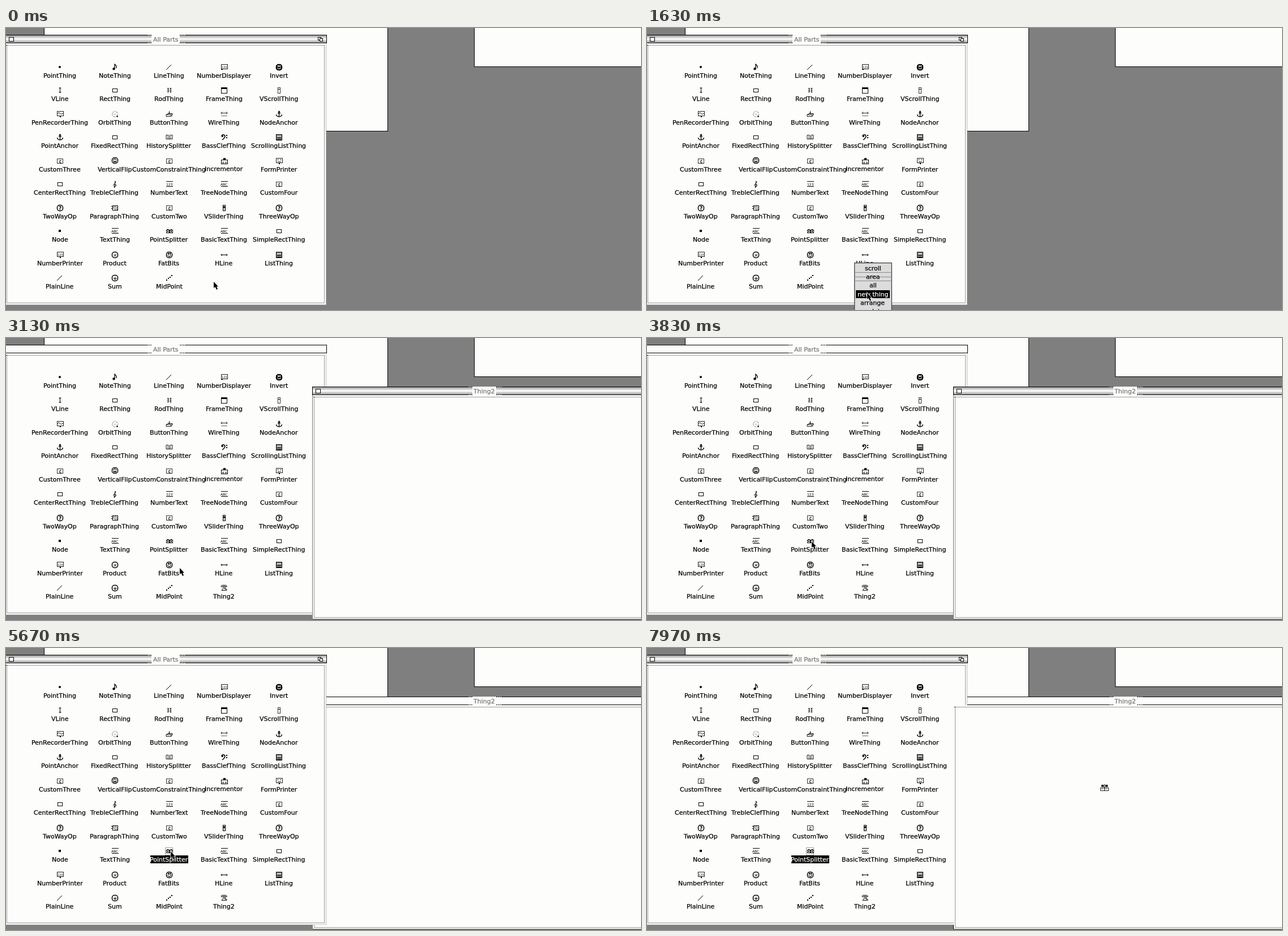
Write an HTML page with a canvas that moves like this. It is 1122 by 499 pixels and loops after 8 s.

```html
<!DOCTYPE html>
<html lang="en">
<head>
<meta charset="utf-8">
<title>All Parts</title>
<style>
html, body { margin: 0; width: 100%; height: 100%; overflow: hidden; background: #7f7f7f; }
canvas { display: block; }
</style>
</head>
<body>
<canvas id="stage" width="1122" height="499"></canvas>
<script>
const c = document.getElementById('stage').getContext('2d', { alpha: false });
const WHITE = '#fdfdfb', GRAY = '#7f7f7f', INK = '#000';
const LOOP = 8000;
const MENU_OPEN = 600, CREATED = 1670, THING_OFF = 4140, PARTS_ON = 4210;
const SELECTED = 5400, PICKED = 6130, PANE_RAISED = 6720;

// Drawing helpers
function bar(x, y, w, h, color = INK) { c.fillStyle = color; c.fillRect(x, y, w, h); }
function box(x, y, w, h, color = INK, fill) {
  if (fill) bar(x, y, w, h, fill);
  c.strokeStyle = color;
  c.lineWidth = 1;
  c.strokeRect(x + .5, y + .5, w - 1, h - 1);
}
function path(d, width = 1) {
  c.strokeStyle = INK;
  c.lineWidth = width;
  c.stroke(new Path2D(d));
}
function disc(x, y, r, color = INK) {
  c.fillStyle = color;
  c.beginPath();
  c.arc(x, y, r, 0, 7);
  c.fill();
}
function text(s, x, baseline, color = INK, size = 11, weight = '') {
  c.font = `${weight} ${size}px "DejaVu Sans", sans-serif`;
  c.fillStyle = c.strokeStyle = color;
  c.lineWidth = .25;
  const left = Math.round(x - c.measureText(s).width / 2);
  c.fillText(s, left, baseline);
  if (size === 11) c.strokeText(s, left, baseline);
}

// Icons, drawn around their own centre
function badge(fill) {
  c.beginPath();
  c.roundRect(-4.5, -4.5, 10, 10, 4);
  c.lineWidth = 1.5;
  c.strokeStyle = c.fillStyle = INK;
  c.stroke();
  if (fill) c.fill();
}
function face(inverse) {
  badge(inverse);
  const color = inverse ? WHITE : INK;
  bar(-2, -3, 2, 3, color);
  bar(1, -3, 2, 3, color);
  c.strokeStyle = color;
  c.lineWidth = 1.2;
  c.beginPath();
  c.arc(.5, .5, 2.8, .2, 2.95);
  c.stroke();
}
function lettered(s) {
  bar(-5, -5, 12, 1);
  bar(-5, 4, 12, 1);
  text(s, .5, 3, INK, 6);
}
function screen(draw) {
  box(-5, -5, 12, 9, '#222');
  draw();
}
function op(sign, weight) {
  badge();
  text(sign, .5, 4, INK, 9, weight);
}
function splitter() {
  for (const x of [-5, 1]) {
    box(x, -2, 6, 6);
    bar(x + 2, -3, 2, 1);
    bar(x + 2, 0, 2, 2);
  }
  bar(0, 1, 2, 1);
}
const number = () => screen(() => text('123', 1, 2, INK, 5));
const foot = () => path('M1 4V6', 2);
const icons = {
  dot() { disc(0, 0, 2); },
  note() { path('M0 3V-5Q4 -2 3 2', 1.3); disc(-1.5, 3.3, 2.2); },
  line() { path('M-5 5L4 -4'); },
  display() { number(); bar(-5, 4, 3, 1); },
  invert() { face(true); },
  fatBits() { face(); },
  flip() { c.rotate(Math.PI); c.translate(-1, 0); face(); },
  vline() { path('M.5 -4V5M-1.5 -3L.5 -5L2.5 -3M-1.5 3L.5 5L2.5 3'); },
  hline() { path('M-5 .5H6M-3 -1.5L-5 .5L-3 2.5M4 -1.5L6 .5L4 2.5'); },
  wire() { path('M-5 -1.5H6M-3 -4L-5 -1.5L-3 .5M4 -4L6 -1.5L4 .5', .8); path('M-5 3.5H6', .6); },
  rect() { box(-4, -3, 9, 7); },
  rod() { for (let y = -4; y < 5; y += 3) { bar(-3, y, 1, 2); bar(2, y, 2, 2); } bar(-1, -4, 1, 8); },
  frame() { box(-5, -5, 11, 11); bar(-5, -5, 11, 3); },
  vscroll() { box(-2, -5, 5, 11, '#333'); bar(-1, -2, 3, 1); },
  vslider() { box(-2, -5, 5, 11); bar(-1, -3, 3, 4, '#333'); bar(-1, 3, 3, 1, '#777'); },
  pen() { screen(() => path('M-4 0Q-2 -4 0 -1T6 -1', .9)); foot(); },
  orbit() {
    for (let i = 0; i < 12; i++) {
      const a = i * Math.PI / 6;
      bar(Math.round(5 * Math.cos(a)), Math.round(5 * Math.sin(a)), 1, 1, '#444');
    }
    bar(0, 0, 1, 1);
    disc(4.5, 4.5, 1.3);
  },
  button() { path('M-5 1.5H3.5V4.5H-5ZL-2 -.5H6L3.5 1.5M6 -.5V2L3.5 4.5M.5 -5V0M-1 -2L.5 0L2 -2', .9); },
  anchor() { path('M.5 -3V5M-2 -1.5H3M-4.5 1Q-4 5 .5 5Q5 5 5.5 1', 1.4); disc(.5, -4, 1.5); },
  history() { path('M-5 -3.5H-1L.5 -2L2 -3.5H6V3.5H-5ZM.5 -2V3.5M-3 -1H-1M-3 1.5H-1M2 -1H4M2 1.5H4', .9); },
  bass() { path('M-4 -1Q-4 -5 0 -4Q5 -1 -3 5', 1.5); disc(-2.5, -1.5, 1.6); bar(4, -4, 2, 2); bar(4, 0, 2, 2); },
  treble() { path('M.5 6V-5Q4 -4 -1 0Q-4 3 0 4Q4 4 2 1Q0 0 -1 2', .9); disc(-.5, 5.5, 1); },
  list() { box(-5, -5, 11, 11, INK, '#888'); for (let y = -2; y < 5; y += 3) bar(-3, y, 7, 1, y < 0 ? WHITE : INK); },
  custom() { box(-5, -4, 11, 9, '#333'); text('¢', .5, 4, INK, 9); },
  increment() { box(-5, -2, 12, 8); bar(-1, -5, 4, 3); text('++', 1, 5, INK, 6, 'bold'); },
  form() { screen(() => { bar(-2, -3, 1, 2); bar(3, -3, 1, 2); path('M-2 1.5H4', .8); }); foot(); },
  printer() { number(); foot(); },
  digits() { lettered('123'); },
  letters() { lettered('ABC'); },
  ask() { op('?', 'bold'); },
  times() { op('×', ''); },
  plus() { op('+', 'bold'); },
  hatch() { box(-4, -4, 10, 9); path('M-3 -1L2 4M-3 -4L5 4M0 -4L5 1', .8); bar(-6, -3, 2, 1); bar(-6, 1, 2, 1); },
  node() { bar(-2, -2, 4, 4); },
  splitter,
  mid() { for (let i = 0; i < 4; i++) bar(-5 + 3 * i, 3 - 3 * i + (i > 1), 2, 2); },
  thing() { path('M-4.5 -1.5Q-6 -4.5 -2 -4.5H2Q6 -4.5 5 -1.5L3 -2.5H-2ZM-1 -2V1L-4 4.5H5V2.5H2V-2M0 .5H3'); }
};

const parts = `PointThing dot,NoteThing note,LineThing line,NumberDisplayer display,Invert invert,
VLine vline,RectThing rect,RodThing rod,FrameThing frame,VScrollThing vscroll,
PenRecorderThing pen,OrbitThing orbit,ButtonThing button,WireThing wire,NodeAnchor anchor,
PointAnchor anchor,FixedRectThing rect,HistorySplitter history,BassClefThing bass,ScrollingListThing list,
CustomThree custom,VerticalFlip flip,CustomConstraintThing custom,Incrementor increment,FormPrinter form,
CenterRectThing rect,TrebleClefThing treble,NumberText digits,TreeNodeThing letters,CustomFour custom,
TwoWayOp ask,ParagraphThing hatch,CustomTwo custom,VSliderThing vslider,ThreeWayOp ask,
Node node,TextThing letters,PointSplitter splitter,BasicTextThing letters,SimpleRectThing rect,
NumberPrinter printer,Product times,FatBits fatBits,HLine hline,ListThing list,
PlainLine line,Sum plus,MidPoint mid,Thing2 thing`.split(',').map(s => s.trim().split(' '));

function drawIcon(draw, x, y) {
  c.save();
  c.translate(x, y);
  draw();
  c.restore();
}

function drawParts(t) {
  parts.forEach(([name, icon], i) => {
    if (name === 'Thing2' && t < CREATED) return;
    const x = Math.round(95 + 96.7 * (i % 5));
    const y = Math.round(84 + 41.45 * Math.floor(i / 5));
    const chosen = name === 'PointSplitter' && t >= SELECTED;
    if (chosen) {
      bar(255, y - 7, 67, 14);
      box(x - 7, y - 21, 14, 14, '#999');
    }
    drawIcon(icons[icon], x, y - 15);
    text(name, x, y + (name === 'Incrementor' ? 3 : 4), chosen ? WHITE : INK);
  });
}

function titleBar(x, y, w, title, center, active) {
  box(x, y, w, 15, INK, WHITE);
  if (active) {
    const shade = c.createLinearGradient(0, y + 1, 0, y + 14);
    [[0, '#999'], [.5, '#fff'], [1, '#999']].forEach(s => shade.addColorStop(...s));
    bar(x + 1, y + 1, w - 2, 13, shade);
    box(x + 6, y + 4, 9, 8, INK, WHITE);
    box(x + w - 16, y + 4, 6, 6, INK, WHITE);
    box(x + w - 13, y + 6, 6, 6, INK, WHITE);
  }
  const half = center < 300 ? 25 : 21;
  bar(center - half, y, 2 * half, 17, WHITE);
  for (const side of [-half - 8, half])
    for (let i = 0; i < 8; i += 3)
      for (const edge of [0, 14]) bar(center + side + i + 2, y + edge, 1, 1, WHITE);
  text(title, center, y + 12, '#777');
}

function pane(x, y, w, h) {
  bar(x, y, w, h, WHITE);
  box(x + 2, y + 3, w - 5, h - 6, '#999');
  bar(x + 1, y + 3, 2, 1);
}

function partsWindow(t, active) {
  pane(-1, 27, 567, 463);
  bar(565, 28, 1, 462, '#bbb');
  bar(0, 489, 566, 1, '#ccc');
  titleBar(-1, 12, 568, 'All Parts', 282, active);
  drawParts(t);
}

function thingPane() {
  pane(542, 101, 620, 397);
  bar(541, 490, 1, 8);
  bar(541, 497, 581, 1, '#555');
}
function thingWindow(active) {
  thingPane();
  bar(541, 101, 1, 397, '#777');
  titleBar(541, 86, 607, 'Thing2', 845, active);
}

function backdrop() {
  bar(0, 0, 1122, 499, GRAY);
  box(67, -2, 608, 185, INK, WHITE);
  box(827, -2, 300, 71, INK, WHITE);
}

function menu() {
  box(366, 415, 67, 100, '#444', '#dcdcdc');
  box(367, 416, 65, 100, '#aaa');
  for (const y of [432, 440, 447]) bar(368, y, 63, 1, '#888');
  ['scroll', 'area', 'all', 'new thing', 'arrange', 'update'].forEach((item, i) => {
    const y = Math.round(425 + 15.2 * i), chosen = i === 3;
    if (chosen) bar(369, y - 7, 60, 14);
    text(item, 399, y + 4, chosen ? WHITE : INK);
  });
}

// Positions are [time, x, y], eased from stop to stop
const pointerStops = [[150, 367, 449], [600, 389, 462], [1000, 389, 469], [2250, 389, 469],
  [3130, 307, 407], [3750, 291, 360], [LOOP, 291, 360]];
const carryStops = [[PICKED, 289, 360], [6770, 654, 190], [7650, 808, 247], [LOOP, 808, 247]];

function along(stops, t) {
  const i = stops.findIndex(s => s[0] > t);
  if (i < 1) return stops[0].slice(1);
  const [t0, x0, y0] = stops[i - 1], [t1, x1, y1] = stops[i];
  const u = (t - t0) / (t1 - t0), k = u * u * (3 - 2 * u);
  return [Math.round(x0 + (x1 - x0) * k), Math.round(y0 + (y1 - y0) * k)];
}

function pointer() {
  const arrow = new Path2D('M0 0V11L2.5 9L5 14L7 13L5 8.5H8Z');
  c.strokeStyle = WHITE;
  c.lineWidth = 1.5;
  c.stroke(arrow);
  c.fillStyle = INK;
  c.fill(arrow);
}

function carried() {
  for (const x of [-7, 0]) {
    bar(x + 2, -5, 4, 4);
    box(x, 0, 8, 6, '#222', WHITE);
    bar(x + 2, 2, 3, 1, '#777');
  }
  bar(0, -6, 1, 12);
}

function render(t) {
  backdrop();
  if (t < CREATED) {
    partsWindow(t, true);
    if (t >= MENU_OPEN) menu();
  } else if (t < PARTS_ON) {
    partsWindow(t, false);
    thingWindow(t < THING_OFF);
  } else {
    thingWindow(false);
    partsWindow(t, true);
    if (t >= PANE_RAISED) thingPane();
  }
  if (t < PICKED) drawIcon(pointer, ...along(pointerStops, t));
  else drawIcon(carried, ...along(carryStops, t));
}

const start = performance.now();
function tick() {
  render((performance.now() - start) % LOOP);
  requestAnimationFrame(tick);
}
tick();
</script>
</body>
</html>
```
